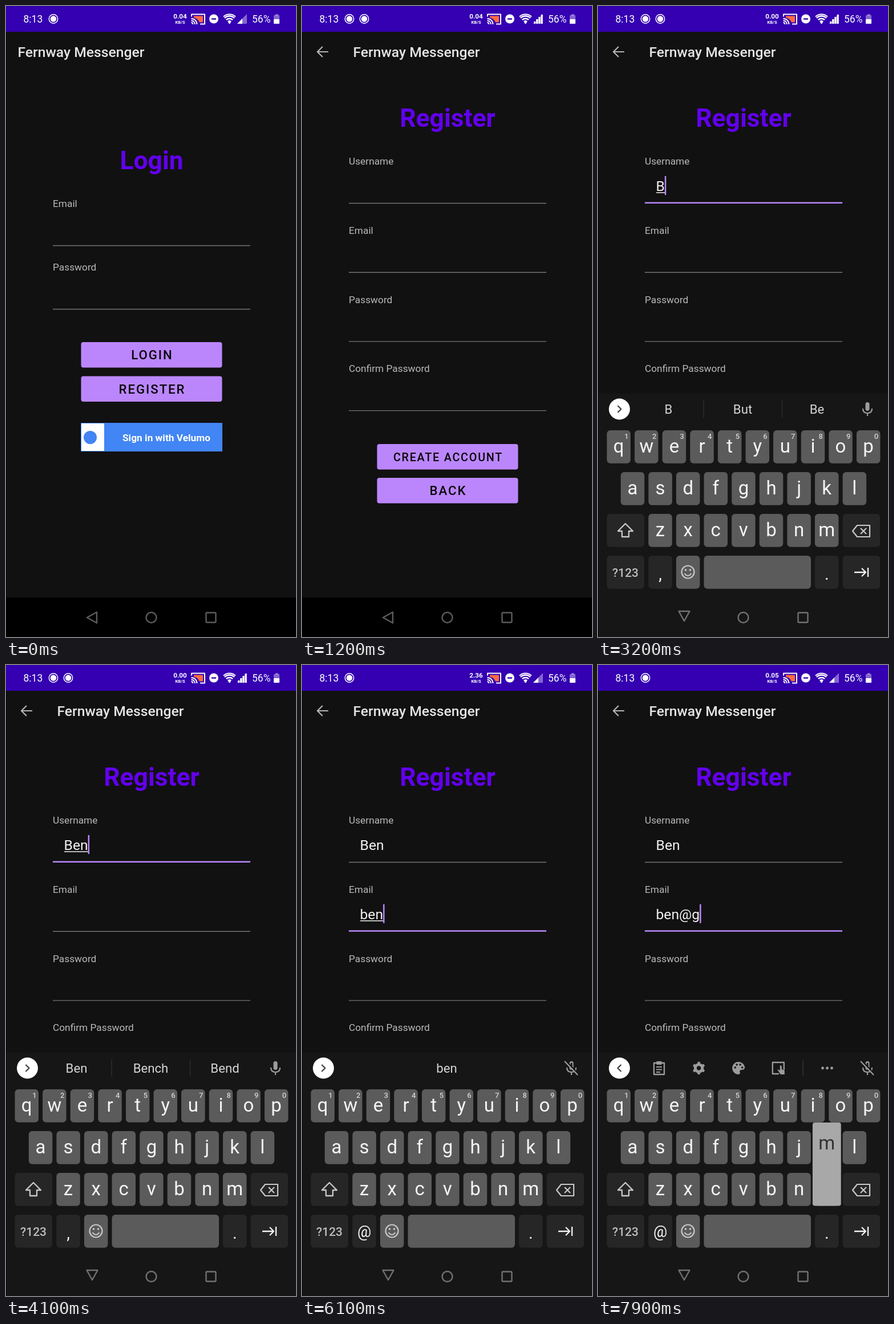
An HTML page with a canvas for the animation above (8000 ms loop, 508x1102 px).

```html
<!DOCTYPE html>
<html lang="en">
<head>
<meta charset="utf-8">
<title>Register screen</title>
<style>
  html, body { margin: 0; width: 100%; height: 100%; overflow: hidden; background: #000; }
  canvas { display: block; width: 100vw; height: 100vh; }
</style>
</head>
<body>
<canvas id="stage" width="508" height="1102"></canvas>
<script>
const ctx = document.getElementById('stage').getContext('2d');
const LOOP = 8000, STEP = 100;
const OPEN = 1000, FOCUS = 1950, SHIFT = 2500, NEXT = 4500;
const APP = '#111111', BOARD = '#161616', ACCENT = '#bb86fc', GREY = '#9c9c9c';
const clamp = v => Math.max(0, Math.min(1, v));

// Each tap commits at its time; the key preview shows shortly before.
const taps = [
  [3000, 'b'], [3500, 'e'], [3900, 'n'],
  [5300, 'b'], [5600, 'e'], [5900, 'n'], [6400, '@'], [6900, 'g'], [8000, 'm']
];

// ---------- drawing helpers ----------
function text(s, x, y, size, color, { weight = 400, align = 'left', spacing = 0 } = {}) {
  ctx.font = `${weight} ${size}px Roboto, sans-serif`;
  ctx.textAlign = align;
  ctx.letterSpacing = spacing + 'px';
  ctx.fillStyle = color;
  ctx.fillText(s, x, y);
}
function box(x, y, w, h, color, r = 0) {
  ctx.fillStyle = color;
  ctx.beginPath();
  ctx.roundRect(x, y, w, h, r);
  ctx.fill();
}
function dot(x, y, r, color) {
  ctx.fillStyle = color;
  ctx.beginPath();
  ctx.arc(x, y, r, 0, 7);
  ctx.fill();
}
function ring(x, y, r, width, color, from = 0, to = 2 * Math.PI) {
  ctx.strokeStyle = color;
  ctx.lineWidth = width;
  ctx.beginPath();
  ctx.arc(x, y, r, from, to);
  ctx.stroke();
}
function path(d, x, y, color, width = 0, angle = 0) {
  ctx.save();
  ctx.translate(x, y);
  ctx.rotate(angle);
  ctx.lineJoin = 'round';
  ctx.strokeStyle = ctx.fillStyle = color;
  ctx.lineWidth = width;
  const p = new Path2D(d);
  width ? ctx.stroke(p) : ctx.fill(p);
  ctx.restore();
}

// ---------- status and navigation bars ----------
function statusBar(t) {
  const twoDots = t >= OPEN && t < 5000;
  const speed = t < FOCUS ? '0.04' : t < 5000 ? '0.00' : t < 7000 ? '2.36' : '0.05';
  const white = '#fff', faint = 'rgba(255,255,255,.4)';
  box(0, 0, 508, 45, '#3400b2');
  text('8:13', 30.5, 28.5, 17.5, white);
  for (const x of twoDots ? [83, 109] : [83]) {
    ring(x, 22.5, 7.7, 1.5, white);
    dot(x, 22.5, 5.2, white);
  }
  const bold = { weight: 700, align: 'center' };
  text(speed, 305, 22, 11.8, white, bold);
  text('KB/S', 305, 30.5, 7.6, white, bold);

  path('M0 4V0H23V17H15', 325, 14.5, white, 2);
  path('M4 3H20V14H14Q11 7 4 6Z', 325, 14.5, '#ff6b3d');
  for (const r of [3, 6.5, 10]) ring(324.5, 32, r, 1.8, white, -Math.PI / 2, 0);
  dot(364, 22.5, 8, white);
  box(360, 21.4, 8, 2.4, '#3400b2');
  for (const r of [4, 8.5, 13, 16]) ring(391.5, 30.5, r, r === 16 ? 1.8 : 2.4, white, -2.3, -.84);
  dot(391.5, 29, 2, white);
  path('M0 17L17 0V17Z', 405, 14, faint);
  if (twoDots) for (let i = 0; i < 4; i++) box(406 + i * 4.2, 27 - i * 4, 3, 4 + i * 4, white);
  else path('M0 17L9 8V17Z', 405, 14, white);
  text('56%', 431, 28.5, 17.5, white);
  box(472, 14, 4.5, 3, faint);
  box(469, 16, 10, 15, faint, 1);
  box(469, 23, 10, 8, white, 1);
}
function navBar(show) {
  const turn = show ? 1 - (1 - show) ** 1.6 : 0;
  const color = show ? '#717171' : '#5c5c5c';
  path('M-9 0L8-9.5V9.5Z', 151, 1068 - 3 * turn, color, 2.4, turn * Math.PI * 1.5);
  ring(254.5, 1068, 9, 2.4, color);
  path('M-7-8.5H7Q8.5-8.5 8.5-7V7Q8.5 8.5 7 8.5H-7Q-8.5 8.5-8.5 7V-7Q-8.5-8.5-7-8.5Z', 359, 1068, color, 2.4);
}

// ---------- app screens ----------
function field(label, base, focused) {
  text(label, 82, base, 17.3, '#b9b9b9');
  if (focused) box(82, base + 65.3, 346, 2.5, ACCENT);
  else box(82, base + 66.5, 346, 1.4, '#747474');
}
function button(label, y, size = 22.2) {
  box(131.5, y, 247, 44.5, ACCENT, 4);
  text(label, 256, y + 22.5 + size * .36, size, '#08060a', { weight: 500, align: 'center', spacing: size * .0892 });
}
function screen(title, x, heading, base) {
  box(1, 45, 507, 988, APP);
  text(title, x, 89.3, 24.7, '#e4e4e4', { weight: 500 });
  text(heading, 255, base, 44.4, '#6200ee', { weight: 700, align: 'center' });
}
function loginScreen() {
  screen('Fernway Messenger', 20.5, 'Login', 284.7);
  field('Email', 351.3);
  field('Password', 462.3);
  button('LOGIN', 587);
  button('REGISTER', 646.5);
  box(131, 728, 248, 50, '#4285f4', 1);
  box(132, 729, 40, 48, '#fff');
  dot(147.5, 753.5, 11.5, '#4285f4');
  text('Sign in with Velumo', 204, 760, 17.3, '#fff', { weight: 700 });
}
function entry(s, y, underlined, cursor) {
  text(s, 101.5, y, 24.7, '#f2f2f2');
  const w = ctx.measureText(s).width;
  if (underlined && s) box(102, y + 2.2, w, 1.5, '#f2f2f2');
  if (cursor) box(101.5 + w, y - 26, 2.5, 33, ACCENT);
}
function registerScreen(state) {
  screen('Fernway Messenger', 89.5, 'Register', 210.5);
  path('M10 0H-8M0-9L-9 0L0 9', 36, 80, '#b4b4b4', 2.2);
  ['Username', 'Email', 'Password', 'Confirm Password'].forEach((label, i) =>
    field(label, 277.3 + i * 120.7, state.focus === i));
  const { name, email, focus, blink } = state;
  entry(name, 323, focus === 0, focus === 0 && blink);
  entry(email, 443.8, focus === 1 && !email.includes('@'), focus === 1 && blink);
  button('CREATE ACCOUNT', 765, 19.76);
  button('BACK', 824);
}

// ---------- keyboard ----------
const ROWS = [['qwertyuiop', 15.5, 741], ['asdfghjkl', 39.8, 814], ['zxcvbnm', 88.3, 887]];
const keys = ROWS.flatMap(([letters, x, y]) =>
  [...letters].map((id, i) => ({ id, x: x + i * 48.6, y, hint: y === 741 ? (i + 1) % 10 : '' })));
const comma = { id: '@', x: 88.3, y: 960 };

const tools = {
  sticker(x, y) {
    path('M-10-10H10V4L4 10H-10Z', x, y, GREY, 2.3);
    path('M-6 1Q0 9 6 1Z', x, y, GREY);
    dot(x - 4, y - 4, 1.8, GREY);
    dot(x + 4, y - 4, 1.8, GREY);
  },
  gif: (x, y) => text('GIF', x, y + 6.5, 18.5, GREY, { weight: 900, align: 'center' }),
  clipboard(x, y) {
    path('M-9-9H9V11H-9Z', x, y, GREY, 2.3);
    path('M-5-2H5M-5 2.5H5M-5 7H2', x, y, GREY, 2);
    box(x - 5, y - 12, 10, 6, GREY, 2);
  },
  gear(x, y) {
    ring(x, y, 6.2, 5, GREY);
    for (let i = 0; i < 6; i++) path('M-2.5-7L-2-11H2L2.5-7Z', x, y, GREY, 0, i * Math.PI / 3);
  },
  palette(x, y) {
    path('M0-11A11 11 0 0 0 0 11Q4 10 2 6Q2 3 6 3Q11 3 11-2Q9-10 0-11Z', x, y, GREY);
    for (const [dx, dy] of [[-6, -1], [-3, -6], [3, -6], [6.5, -1]]) dot(x + dx, y + dy, 1.8, BOARD);
  },
  note(x, y) {
    path('M1 10H-10V-10H10V3', x, y, GREY, 2.3);
    path('M-2 2L3 4V-4Q5-6 6-3V2L11 4V11H4Z', x, y, GREY);
  }
};

function mic(x, y, off) {
  box(x - 3.5, y - 12, 7, 15, GREY, 3.5);
  path('M-8-1Q-8 7 0 7Q8 7 8-1M0 7V12', x, y, GREY, 2.2);
  if (!off) return;
  box(x - 1.5, y - 9.5, 3, 10, BOARD, 1.5);
  path('M-10-13L12 10', x, y, BOARD, 2.5);
  path('M-12-12L11 12', x, y, GREY, 2.2);
}
function strip({ focus, words }) {
  dot(37.5, 704, 18.5, '#fff');
  path(words ? 'M-3-6L3 0L-3 6' : 'M3-6L-3 0L3 6', 37.5, 704, '#444', 2.3);
  if (words) {
    words.forEach((w, i) => text(w, 123.5 + i * 130, 712, 22.2, '#d6d6d6', { align: 'center' }));
    if (focus === 0) for (const x of [184.5, 322]) box(x, 689, 1.2, 30, '#333');
  } else {
    const names = focus ? ['clipboard', 'gear', 'palette', 'note'] : ['sticker', 'gif', 'clipboard', 'gear'];
    names.forEach((n, i) => tools[n](107 + i * 69.6, 704));
    box(358.5, 691, 1.2, 27, '#3a3a3a');
    for (const dx of [-8, 0, 8]) dot(401.5 + dx, 704, 2.4, GREY);
  }
  mic(472, 704, focus === 1);
}
function keyboard(state, show) {
  const { upper, pressed, focus } = state;
  const glyph = id => upper ? id.toUpperCase() : id;
  const center = { align: 'center' }, dark = '#262626', light = '#5b5b5b', ink = '#f5f5f5', soft = '#c9c9c9';
  ctx.save();
  ctx.globalAlpha = clamp(show * 1.7);
  box(1, 1033, 507, 69, BOARD);
  ctx.beginPath();
  ctx.rect(0, 0, 508, 1033);
  ctx.clip();
  ctx.translate(0, 112 * (1 - show) ** 3);
  box(1, 677, 507, 425, BOARD);
  strip(state);

  for (const { id, x, y, hint } of keys) {
    box(x, y, 41.5, 57.7, light, 6);
    text(glyph(id), x + 20.7, y + 39, 33, ink, center);
    text(hint, x + 34.5, y + 14.8, 13, '#d2d2d2', { weight: 500, align: 'center' });
  }
  for (const [x, y] of [[15.5, 887], [428.6, 887], [15.5, 960], [428.6, 960]]) box(x, y, 65.5, 57.7, dark, 6);
  for (const x of [88.3, 380]) box(x, 960, 41.5, 57.7, dark, 6);
  box(136.9, 960, 41.5, 57.7, light, 6);
  box(185.5, 960, 187.5, 57.7, light, 6);

  const shift = 'M0-12L13 1H6V11H-6V1H-13Z';
  path(shift, 48, 916, soft, 2.3);
  if (upper) path(shift, 48, 916, soft);
  path('M-7-10H15V10H-7L-15 0ZM-1-5L9 5M9-5L-1 5', 461, 917, soft, 2.2);
  text('?123', 48, 996.5, 21, '#bebebe', { weight: 500, align: 'center' });
  text(focus === 1 ? '@' : ',', 109, focus === 1 ? 998.5 : 1002, focus === 1 ? 27 : 29, ink, center);
  text('.', 400.7, 1002, 29, ink, center);
  ring(157.5, 988.5, 11, 2.2, soft);
  ring(157.5, 988.5, 6.3, 2, soft, .4, 2.75);
  for (const x of [153.5, 161.5]) dot(x, 985, 1.8, soft);
  path('M-12 0H7M1-7L8 0L1 7M12-8V8', 461, 989, ink, 2.3);

  const key = pressed === '@' ? comma : keys.find(k => k.id === pressed);
  if (key) {
    box(key.x - 4, key.y - 88, 49.8, 145.5, '#a8a8a8', 4);
    text(glyph(key.id), key.x + 20.7, key.y - 41, 33, '#333', center);
  }
  ctx.restore();
}

// ---------- timeline ----------
function stateAt(t) {
  const typed = (from, to) => taps.filter(([at]) => at >= from && at < to && at <= t).map(tap => tap[1]).join('');
  const name = typed(0, NEXT).replace('b', 'B');
  const email = typed(NEXT, LOOP);
  const focus = t < FOCUS ? -1 : t < NEXT ? 0 : 1;
  const lastEdit = Math.max(...[FOCUS, NEXT, ...taps.map(tap => tap[0])].filter(at => at <= t));
  const guesses = { B: ['B', 'But', 'Be'], Be: ['Be', 'Been', 'Best'], Ben: ['Ben', 'Bench', 'Bend'] };
  const words = focus === 0 ? guesses[name] : email && !email.includes('@') ? ['', email, ''] : null;
  return {
    name, email, focus, words,
    upper: t >= SHIFT && t < taps[0][0],
    blink: (t - lastEdit) % 1000 < 500,
    pressed: taps.find(([at]) => t >= at - 200 && t < at)?.[1]
  };
}
function draw() {
  const t = Math.floor(performance.now() % LOOP / STEP) * STEP;
  const state = stateAt(t);
  const show = clamp((t - FOCUS) / 300);
  box(0, 0, 508, 1102, '#000');
  const opened = clamp((t - OPEN + STEP) / 300);
  if (opened < 1) loginScreen();
  if (opened > 0) {
    ctx.save();
    ctx.globalAlpha = opened;
    ctx.translate(0, 30 * (1 - opened) ** 2);
    registerScreen(state);
    ctx.restore();
  }
  if (show) keyboard(state, show);
  else box(0, 1033, 508, 69, '#000');
  navBar(show);
  statusBar(t);
  requestAnimationFrame(draw);
}
draw();
</script>
</body>
</html>
```
